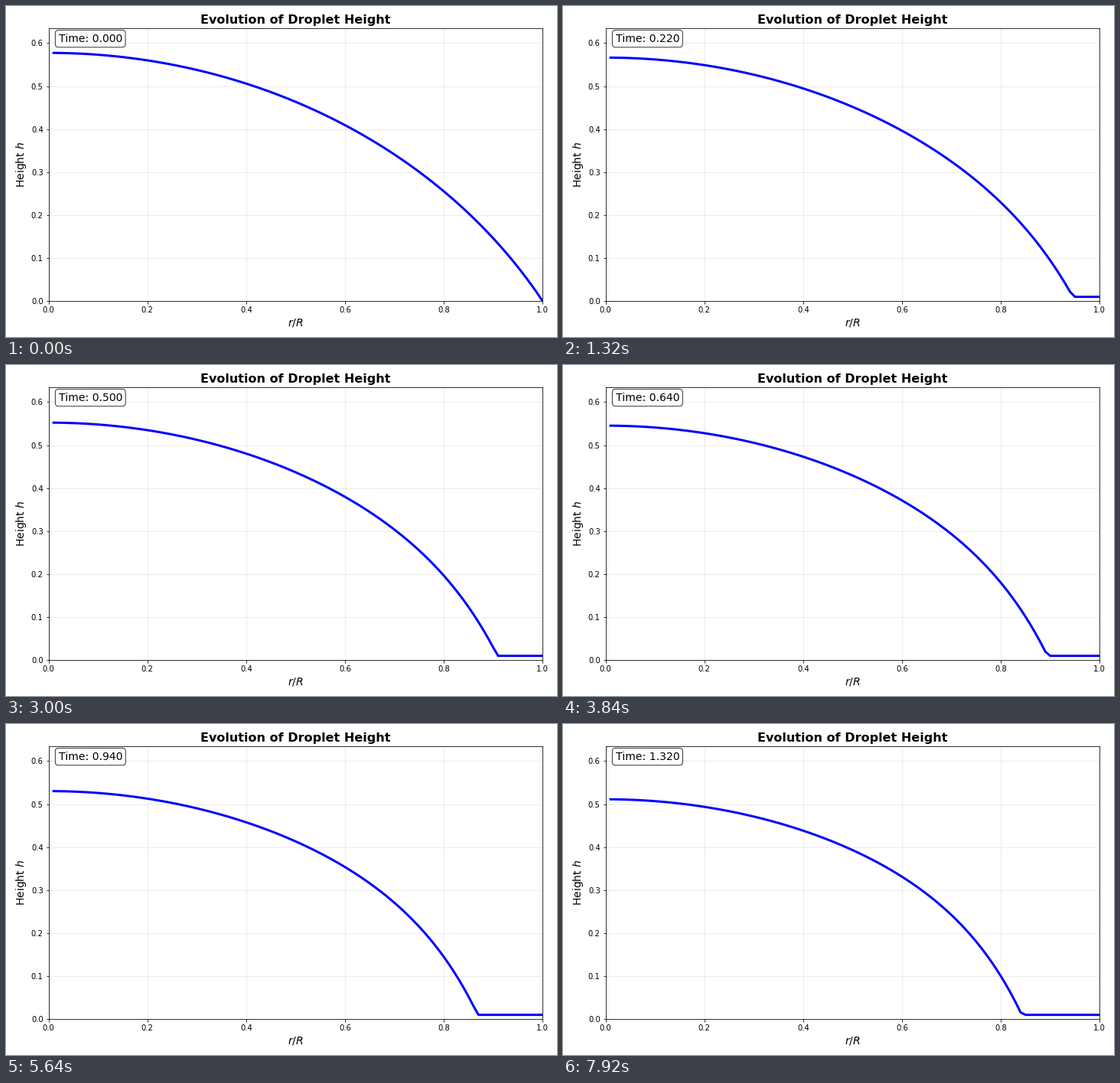
Animation of 720x432 px, one loop 8000 ms. Source, as a matplotlib script:

```python
import numpy as np
import matplotlib.pyplot as plt
from matplotlib.animation import FuncAnimation

INTERVAL = 40          # ms per drawn frame
FRAMES = 200           # 8 s loop
HOLD = 3               # drawn frames per simulation step
DT = 0.02
FLOOR = 0.01           # residual film thickness
ANGLE = np.radians(60)

r = np.linspace(0.01, 1, 100)
cap = np.sqrt(1 / np.sin(ANGLE) ** 2 - r ** 2) - 1 / np.tan(ANGLE)
flux = 0.05 + 0.5 * np.exp(-10 * (1 - r))


def height(t):
    """Spherical cap thinned by evaporation that peaks at the rim."""
    if t == 0:
        return cap
    return np.maximum(cap - flux * t, FLOOR)


fig, ax = plt.subplots(figsize=(10, 6), dpi=72)
line, = ax.plot(r, cap, color="blue", linewidth=3)
ax.set_xlim(0, 1)
ax.set_ylim(0, 1.1 * cap.max())
ax.set_xlabel("$r/R$", fontsize=14)
ax.set_ylabel("Height $h$", fontsize=14)
ax.set_title("Evolution of Droplet Height", fontsize=16, fontweight="bold")
ax.grid(True, alpha=0.3)
label = ax.text(0.02, 0.95, "", transform=ax.transAxes, fontsize=14,
                bbox=dict(boxstyle="round", facecolor="white", alpha=0.8))
fig.tight_layout()


def update(frame):
    t = frame // HOLD * DT
    line.set_ydata(height(t))
    label.set_text(f"Time: {t:.3f}")
    return line, label


anim = FuncAnimation(fig, update, frames=FRAMES, interval=INTERVAL,
                     repeat=True, repeat_delay=0)
plt.show()
```
